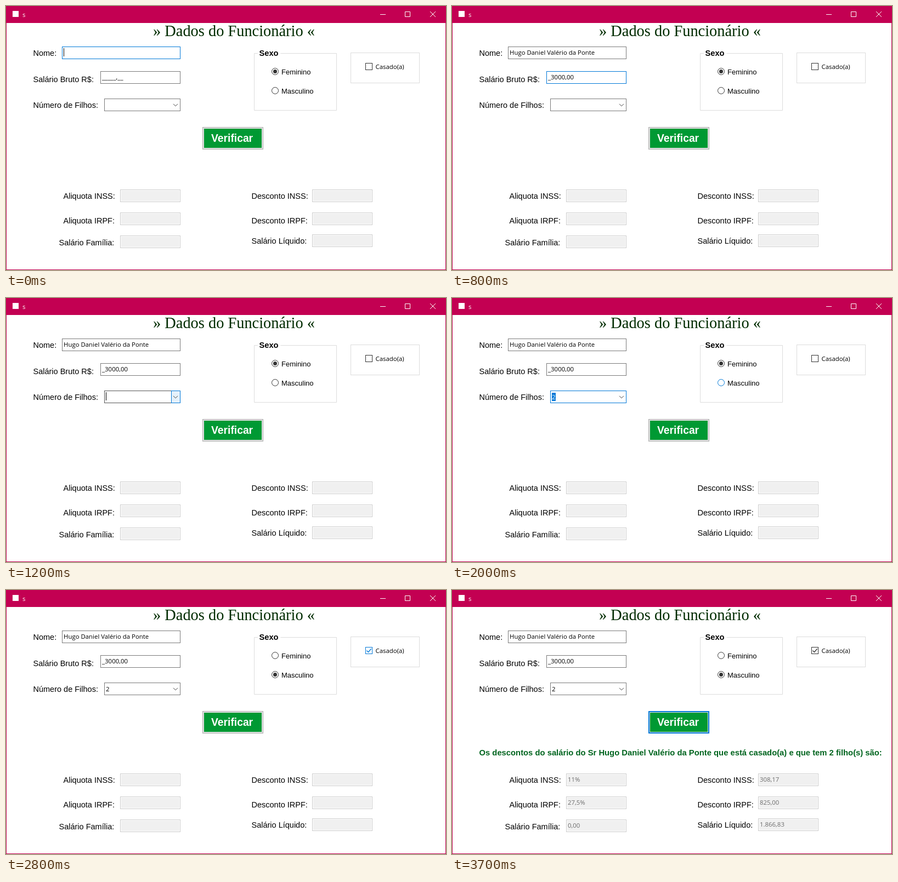
An HTML page that plays this animation: 802x482 px, repeating every 4600 ms.

```html
<!DOCTYPE html>
<html lang="pt-BR">
<head>
<meta charset="utf-8">
<title>Dados do Funcionário</title>
<style>
  html, body { margin: 0; width: 100%; height: 100%; overflow: hidden; background: #fff; }
  svg { display: block; width: 802px; height: 482px; }
  text { white-space: pre; fill: #000; }
  .title { font: 28.4px "Liberation Serif", serif; fill: #002b00; }
  .label { font: 14.5px "Liberation Sans", sans-serif; }
  .option { font: 13px "Liberation Sans", sans-serif; }
  .bold { font: bold 14.67px "Liberation Sans", sans-serif; }
  .button { font: bold 19.3px "Liberation Sans", sans-serif; fill: #fff; }
  .value { font: 11.4px "Open Sans", "Noto Sans", sans-serif; }
  .summary { font-size: 14.8px; fill: #00641e; }
  .muted { fill: #6d6d6d; }
  .white { fill: #fff; }
  .list { filter: drop-shadow(3px 3px 1px rgba(0, 0, 0, .5)); }
</style>
</head>
<body>
<svg id="stage" viewBox="0 0 802 482"></svg>
<script>
const LOOP = 4600;
const PERSON = 'Hugo Daniel Valério da Ponte';
const BLUE = '#0078d7', DARK = '#333', GRAY = '#7a7a7a', PINK = '#c30052';

const fill = (x, y, w, h, color) =>
  `<rect x="${x}" y="${y}" width="${w}" height="${h}" fill="${color}"/>`;
const box = (x, y, w, h, stroke, color = 'none') =>
  `<rect x="${x + .5}" y="${y + .5}" width="${w - 1}" height="${h - 1}" fill="${color}" stroke="${stroke}"/>`;
const text = (x, y, cls, str) => `<text x="${x}" y="${y}" class="${cls}">${str}</text>`;
const line = (d, color, width = 1) =>
  `<path d="${d}" fill="none" stroke="${color}" stroke-width="${width}"/>`;
// Shows its content only from one time to another, in ms.
const during = (from, to, ...parts) =>
  `<g data-from="${from}" data-to="${to}">${parts.join('')}</g>`;
const after = (from, ...parts) => during(from, LOOP, ...parts);

const radio = (y, color, checked) =>
  `<circle cx="490.5" cy="${y}" r="6" fill="#fff" stroke="${color}"/>` +
  (checked ? `<circle cx="490.5" cy="${y}" r="3.5" fill="${color}"/>` : '');
const check = (color, checked) => box(655, 104, 13, 13, color, '#fff') +
  (checked ? line('M657.5 110.5l2.8 3 5.4-6.2', color, 1.3) : '');
const chevron = line('M305 178.8l4 4 4-4', '#444');
const result = (x, y, value) => box(x, y, 110, 23, '#ccc', '#fff') +
  fill(x + 2, y + 2, 106, 19, '#f0f0f0') +
  after(3700, text(x + 3, y + 15, 'value muted', value));

const chrome = [
  fill(0, 0, 802, 482, '#fff'),
  box(0, 0, 802, 482, PINK),
  fill(0, 0, 802, 31, PINK),
  fill(12, 9, 11, 11, '#fff'),
  text(30, 20, 'value white', 's'),
  line('M682 15.5h10M727.5 10.5h9v9h-9zM773 10l10 10M783 10l-10 10', '#fff'),
  text(268, 55, 'title', '» Dados do Funcionário «')
];

const labels = [
  [49.5, 91, 'Nome:'],
  [49.5, 139, 'Salário Bruto R$:'],
  [49.5, 186, 'Número de Filhos:'],
  [104.5, 352, 'Aliquota INSS:'],
  [104.5, 397, 'Aliquota IRPF:'],
  [96.5, 437, 'Salário Família:'],
  [447.5, 352, 'Desconto INSS:'],
  [447.5, 397, 'Desconto IRPF:'],
  [447.5, 434, 'Salário Líquido:']
].map(([x, y, str]) => text(x, y, 'label', str));

const inputs = [
  during(0, 400, box(102, 74, 216, 23, BLUE), fill(105, 77, 1, 15, '#000')),
  after(400, box(102, 74, 216, 23, GRAY), text(105, 89, 'value', PERSON)),

  box(172, 119, 146, 23, GRAY),
  during(400, 1200, box(172, 119, 146, 23, BLUE)),
  during(0, 800, text(175, 134, 'value', '_____,__')),
  after(800, text(175, 134, 'value', '_3000,00')),

  box(179, 169, 139, 23, GRAY),
  during(1200, 1600, box(179, 169, 139, 23, '#555'), box(301, 169, 17, 23, BLUE, '#e5f1fb')),
  during(1600, 2000, box(179, 169, 139, 23, '#555'), box(301, 169, 17, 23, '#005499', '#cce4f7')),
  during(2000, 2400, box(179, 169, 139, 23, BLUE)),
  during(1200, 2000, fill(182, 172, 1, 15, '#000')),
  chevron,
  during(2000, 2400, fill(182, 173, 7, 15, BLUE), text(182, 185, 'value white', '2')),
  after(2400, text(182, 185, 'value', '2'))
];

const choices = [
  line('M459 86.5h-6.5v104h150v-104h-102', '#dcdcdc'),
  text(461.5, 91, 'bold', 'Sexo'),
  during(0, 2400, radio(119.5, DARK, true)),
  after(2400, radio(119.5, DARK, false)),
  text(502, 125, 'option', 'Feminino'),
  during(0, 2000, radio(154.5, DARK, false)),
  during(2000, 2400, radio(154.5, BLUE, false)),
  during(2400, 2800, radio(154.5, BLUE, true)),
  after(2800, radio(154.5, DARK, true)),
  text(502, 160, 'option', 'Masculino'),
  box(628, 85, 126, 56, '#dcdcdc'),
  during(0, 2800, check(DARK, false)),
  during(2800, 3200, check(BLUE, true)),
  after(3200, check(DARK, true)),
  text(673.5, 115, 'value', 'Casado(a)')
];

const button = [
  during(0, 3200, box(358, 221, 111, 41, '#adadad', '#e1e1e1'), fill(361, 224, 105, 35, '#093')),
  after(3200, fill(358, 221, 111, 41, BLUE), fill(360, 223, 107, 37, '#e1e1e1'),
    fill(361, 224, 105, 35, '#093')),
  text(374, 248, 'button', 'Verificar')
];

const results = [
  after(3700, text(49.5, 302, 'bold summary',
    `Os descontos do salário do Sr ${PERSON} que está casado(a) e que tem 2 filho(s) são:`)),
  result(208, 335, '11%'),
  result(208, 377, '27,5%'),
  result(208, 419, '0,00'),
  result(558, 335, '308,17'),
  result(558, 377, '825,00'),
  result(558, 417, '1.866,83')
];

const items = Array.from({ length: 16 }, (_, i) =>
  text(182, 205 + i * 15, i === 2 ? 'value white' : 'value', i));
const list = during(1600, 2000,
  `<g class="list">${box(179, 192, 139, 242, '#555', '#fff')}</g>`,
  fill(179, 191, 139, 2, BLUE),
  fill(180, 223, 137, 15, BLUE),
  ...items);

const stage = document.getElementById('stage');
stage.innerHTML = [...chrome, ...labels, ...inputs, ...choices, ...button, ...results, list].join('');

const timed = [...stage.querySelectorAll('[data-from]')].map(el =>
  ({ el, from: +el.dataset.from, to: +el.dataset.to }));

function draw() {
  const t = performance.now() % LOOP;
  for (const { el, from, to } of timed) {
    el.style.display = t >= from && t < to ? '' : 'none';
  }
  requestAnimationFrame(draw);
}
draw();
</script>
</body>
</html>
```
